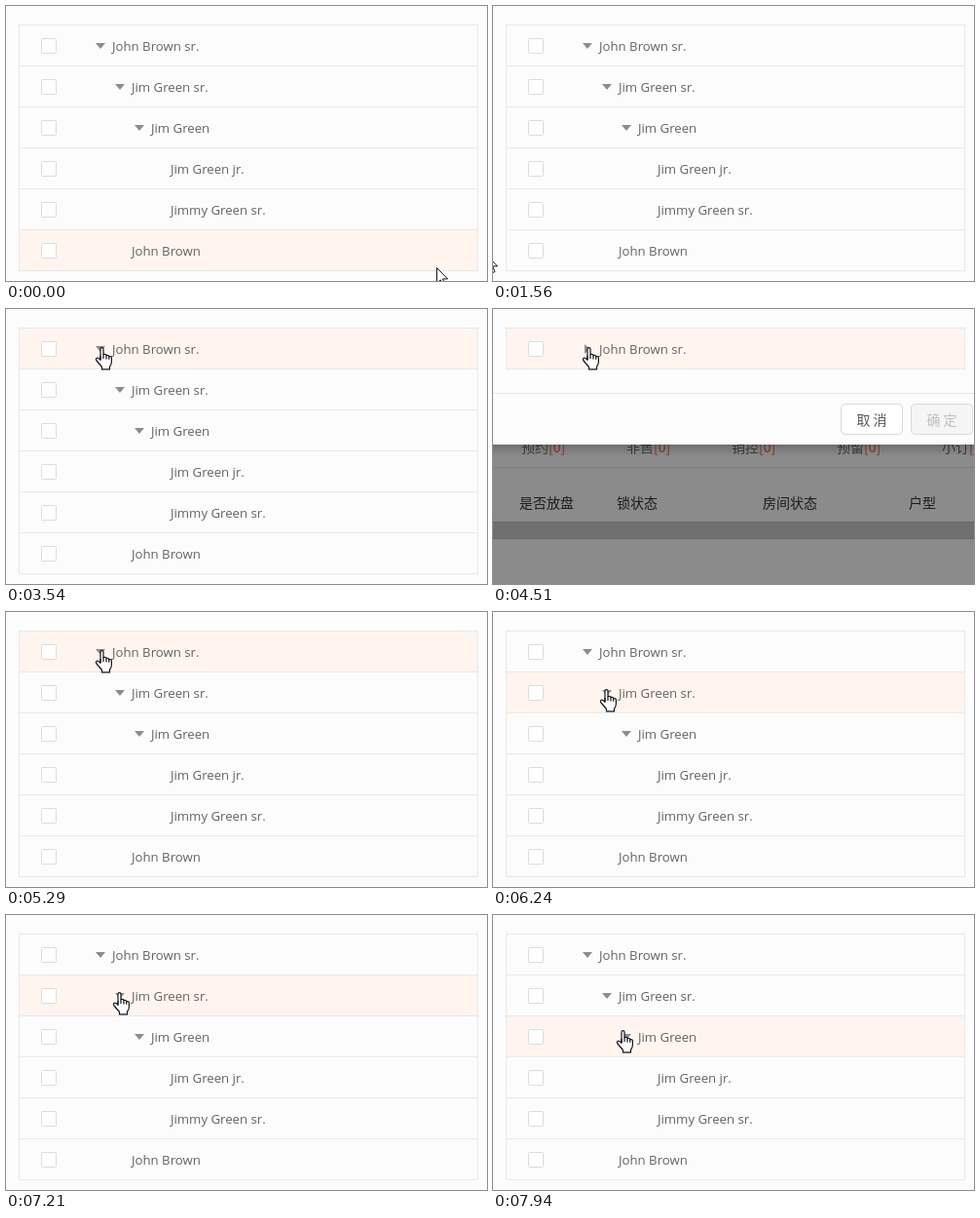
An HTML page that plays this animation: 494 by 282 pixels, repeating every 8 s.

```html
<!DOCTYPE html>
<html lang="zh-CN">
<head>
<meta charset="utf-8">
<title>Tree table</title>
<style>
html, body { margin: 0; width: 100%; height: 100%; overflow: hidden; background: #8a8a8a; }
svg { display: block; width: 494px; height: 282px; }
text { font: 14px "Noto Sans CJK SC", "Noto Sans CJK", sans-serif; }
.name { font: 13.2px "Open Sans", "Noto Sans", sans-serif; fill: #636363; }
.count { fill: #8c3322; }
</style>
</head>
<body>
<svg id="stage" viewBox="0 0 494 282">
  <defs>
    <linearGradient id="shade" x2="0" y2="1">
      <stop offset="0" stop-opacity=".2"/>
      <stop offset="1" stop-opacity="0"/>
    </linearGradient>
  </defs>
  <g id="page">
    <rect width="494" height="282" fill="#8b8b8b"/>
    <path d="M0 162.5H494" stroke="#7c7c7c"/>
    <rect y="218" width="494" height="18" fill="#707070"/>
    <path d="M0 218.5H494M0 235.5H494" stroke="#686868"/>
  </g>
  <g id="dialog"></g>
  <path id="arrow" d="M.5 .5V16.2L4.2 12.8L6.7 18.5L9 17.5L6.5 11.9H11.6Z" fill="#fff" stroke="#111"/>
  <g id="hand" stroke="#15151f" stroke-width="1.2" stroke-linejoin="round">
    <path fill="#fff" d="M5 2.2Q5 .7 6.5 .7T8 2.2V7.6Q10.8 6.8 11 8.6Q13.4 7.8 13.7 9.6Q16.4 9.2 16.4 11.4V15Q16.4 18 14.5 20V22.9H6.5V20.5L1 14Q-.2 12 1.2 11.2Q2.8 10.6 5 13.4Z"/>
    <path fill="none" d="M5 13V9M8 7.6V12M11 8.6V12.4M13.7 9.6V12.8"/>
  </g>
</svg>
<script>
const LOOP = 8000, TOP = 19, ROW = 42;
const $ = id => document.getElementById(id);

// name, depth, has children
const people = [
  ['John Brown sr.', 0, true],
  ['Jim Green sr.', 1, true],
  ['Jim Green', 2, true],
  ['Jim Green jr.', 3, false],
  ['Jimmy Green sr.', 3, false],
  ['John Brown', 1, false]
];

// start, interval, pointer, then x,y for each step
const moves = [
  [0, 120, 'arrow', 442, 268, 428, 267],
  [270, 120, 'arrow', 330, 264, 215, 261, 130, 260],
  [660, 120, 'arrow', 105, 260, 83, 259, 70, 259],
  [1050, 120, 'arrow', 62, 258, 56, 257],
  [1320, 120, 'arrow', 36, 256, 9, 256, -7, 255],
  [1700, 120, 'arrow', -9, 256, -30, 256],
  [2100, 150, 'arrow', -6, 48, 0, 34],
  [2370, 150, 'arrow', 8, 22, 26, 8],
  [2640, 120, 'arrow', 46, 1, 63, 0, 78, 4, 88, 12],
  [3150, 150, 'arrow', 96, 24, 97, 33],
  [3420, 120, 'hand', 91, 38, 92, 39],
  [5660, 150, 'hand', 92, 40],
  [5810, 120, 'arrow', 100, 54, 108, 71],
  [6090, 150, 'hand', 109, 77, 110, 79],
  [7460, 120, 'arrow', 118, 90, 122, 100, 126, 110],
  [7820, 120, 'hand', 126, 116, 127, 118]
];

const steps = moves.flatMap(([start, gap, kind, ...pts]) =>
  Array.from({ length: pts.length / 2 }, (_, i) =>
    ({ at: start + i * gap, kind, x: pts[2 * i], y: pts[2 * i + 1] })));

const rect = (x, y, w, h, fill, extra = '') =>
  `<rect x="${x}" y="${y}" width="${w}" height="${h}" fill="${fill}" ${extra}/>`;
const label = (x, y, str, fill, extra = '') =>
  `<text x="${x}" y="${y}" fill="${fill}" ${extra}>${str}</text>`;
const line = (x1, x2, y) => `<path d="M${x1} ${y + .5}H${x2}" stroke="#e8e8e8"/>`;

function drawPage() {
  const counts = ['预约', '非售', '销控', '预留', '小订'].map((s, i) =>
    label(29 + i * 108, 147, `${s}<tspan class="count">[0]</tspan>`, '#3c3c3c'));
  const heads = [['是否放盘', 27], ['锁状态', 127], ['房间状态', 277], ['户型', 427]]
    .map(([s, x]) => label(x, 204, s, '#1b1b1b'));
  $('page').innerHTML += counts.join('') + heads.join('');
}

function row([name, depth, parent], i, hover, closed) {
  const y = TOP + i * ROW, x = 92 + depth * 20, mid = y + 22;
  let out = hover ? rect(14, y + 1, 471, ROW - 1, '#fff5ee') : '';
  out += rect(36.5, y + 14.5, 15, 15, '#fff', 'stroke="#dcdcdc" rx="1"');
  if (parent) {
    const turn = closed ? `transform="rotate(-90 ${x + 5} ${mid})"` : '';
    out += `<path d="M${x} ${mid - 3}h10l-5 6z" fill="#8c8c8c" ${turn}/>`;
  }
  return out + `<text class="name" x="${x + 17}" y="${y + 27}">${name}</text>` + line(13, 485, y + ROW);
}

function button(x, y, str, fill, ink) {
  return rect(x + .5, y + .5, 63, 31, fill, 'rx="4" stroke="#d9d9d9"') +
    label(x + 32, y + 22, str, ink, 'text-anchor="middle"');
}

function drawDialog(shown, hover, closed) {
  const end = TOP + shown.length * ROW, bottom = end + 78;
  $('dialog').innerHTML =
    rect(0, bottom, 494, 12, 'url(#shade)') +
    rect(0, 0, 494, bottom, '#fcfcfc') +
    line(13, 485, TOP) +
    shown.map((p, i) => row(p, i, i === hover, p === closed)).join('') +
    `<path d="M13.5 ${TOP}V${end}M484.5 ${TOP}V${end}" stroke="#e8e8e8"/>` +
    line(0, 494, end + 25) +
    button(357, end + 36, '取 消', '#fff', '#595959') +
    button(429, end + 36, '确 定', '#f5f5f5', '#bfbfbf');
}

let last = '';
function render(t) {
  const cur = steps.filter(s => s.at <= t).pop();
  const fold = t >= 4510 && t < 5290 ? 0 : t >= 6520 && t < 7210 ? 1 : -1;
  const shown = fold === 0 ? [people[0]]
    : fold === 1 ? [people[0], people[1], people[5]] : people;
  const inside = cur.x >= 13 && cur.x < 485;
  const hover = inside ? Math.floor((cur.y - TOP) / ROW) : -1;

  const key = fold + ',' + hover;
  if (key !== last) drawDialog(shown, hover, people[fold]);
  last = key;

  for (const kind of ['arrow', 'hand']) {
    $(kind).style.display = kind === cur.kind ? '' : 'none';
    $(kind).setAttribute('transform', `translate(${cur.x} ${cur.y})`);
  }
}

drawPage();
const begin = performance.now();
function tick() {
  render((performance.now() - begin) % LOOP);
  requestAnimationFrame(tick);
}
tick();
</script>
</body>
</html>
```
